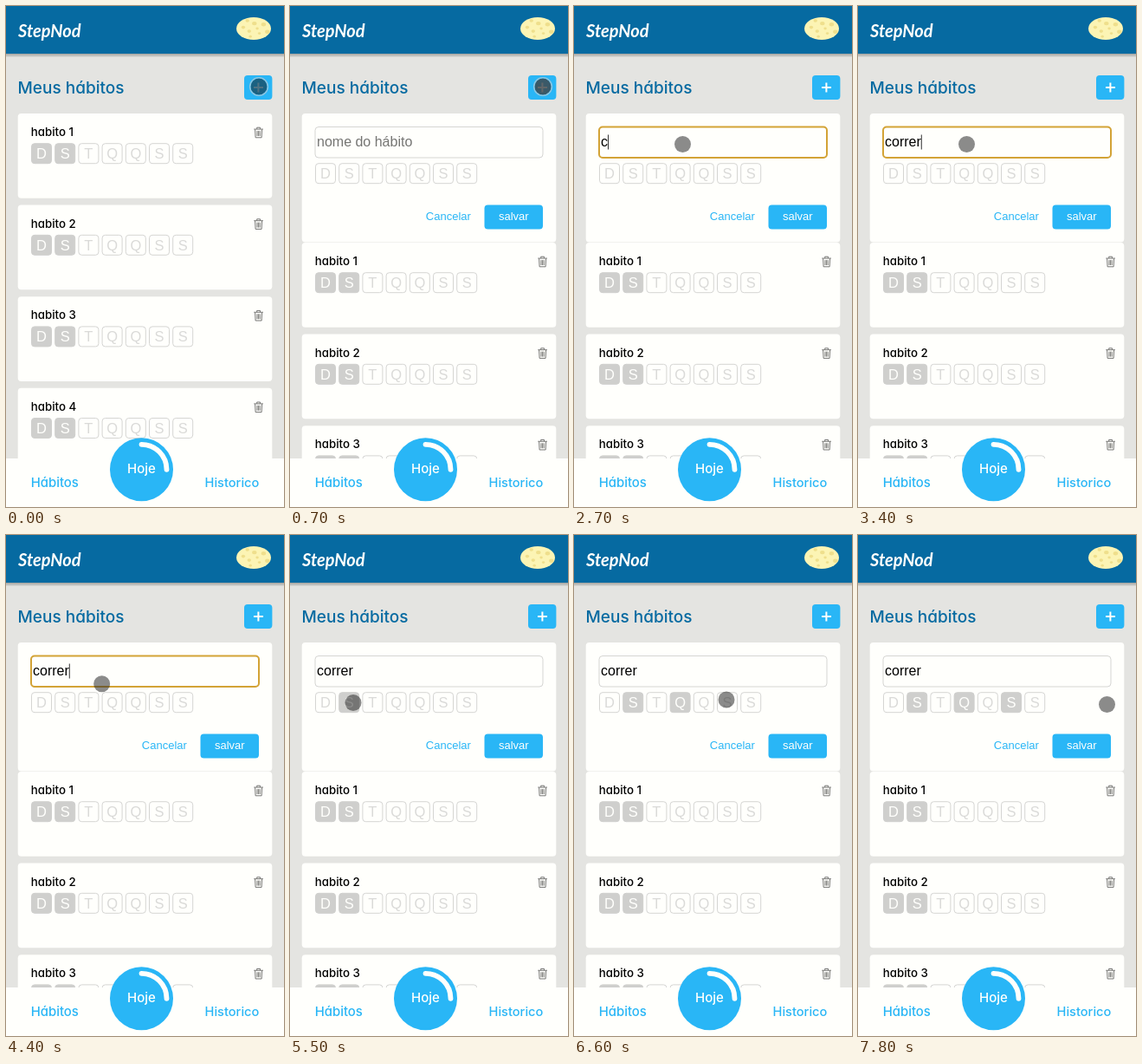
Animation, 321 px wide and 578 px high, one loop 8000 ms. Source, as an HTML page:

```html
<!DOCTYPE html>
<html lang="pt">
<head>
<meta charset="utf-8">
<title>Meus hábitos</title>
<style>
  html, body { margin: 0; width: 100%; height: 100%; overflow: hidden; background: #e4e4e1; }
  svg { display: block; width: 100vw; height: 100vh; }
  text { font-family: Inter, "Noto Sans", sans-serif; font-weight: 500; font-feature-settings: "cv11"; }
  .ui { font-family: "Liberation Sans", Arial, sans-serif; font-weight: 400; }
  .mid { text-anchor: middle; }
  .end { text-anchor: end; }
  .brand { font-family: Lato, sans-serif; font-style: italic; font-weight: 700; }
</style>
</head>
<body>
<svg id="stage" viewBox="0 0 321 578" preserveAspectRatio="none"></svg>
<script>
const NS = 'http://www.w3.org/2000/svg';
const LOOP = 8000, STEP = 100;
const WHITE = '#fffffc', BLUE = '#066aa1', CYAN = '#29b6f6', LINE = '#d5d5d3', CHOSEN = '#cfcfcd';
const PITCH = 105.6;
const stage = document.getElementById('stage');

function set(node, attrs) {
  for (const key in attrs) node.setAttribute(key, attrs[key]);
}
function add(parent, tag, attrs, content) {
  const node = document.createElementNS(NS, tag);
  set(node, attrs);
  if (content !== undefined) node.textContent = content;
  return parent.appendChild(node);
}
const move = (node, x, y) => set(node, { transform: `translate(${x} ${y})` });
const group = (parent, x = 0, y = 0) => add(parent, 'g', { transform: `translate(${x} ${y})` });
const rect = (parent, x, y, width, height, rx, fill, more = {}) =>
  add(parent, 'rect', { x, y, width, height, rx, fill, ...more });
const label = (parent, x, y, size, fill, content, cls = '') =>
  add(parent, 'text', { x, y, 'font-size': size, fill, class: cls }, content);

// One row of weekday boxes; returns a setter for each day
function weekRow(parent, y) {
  return [...'DSTQQSS'].map((day, i) => {
    const left = 29 + i * 27.2;
    const box = rect(parent, left + 0.5, y + 0.5, 23, 23, 3.5, WHITE);
    const letter = label(parent, left + 12, y + 18, 16.5, LINE, day, 'ui mid');
    return on => {
      set(box, { fill: on ? CHOSEN : WHITE, stroke: on ? CHOSEN : LINE });
      set(letter, { fill: on ? WHITE : '#dadad8' });
    };
  });
}

function trash(parent, x, y) {
  add(group(parent, x, y), 'path', {
    d: 'M0 2.5H10.6M3.4 2.3V.6H7.2V2.3M1.3 2.8L1.8 12.2H8.8L9.3 2.8M3.7 4.5V10.4M5.3 4.5V10.4M6.9 4.5V10.4',
    fill: 'none', stroke: '#70706e', 'stroke-width': 0.95
  });
}

function habitCard(parent, index) {
  const card = group(parent, 0, index * PITCH);
  rect(card, 13.7, 124, 293.6, 97.7, 4, WHITE);
  label(card, 28.8, 150.2, 13.3, '#000', `habito ${index + 1}`);
  trash(card, 286.3, 139.6);
  weekRow(card, 158.2).forEach((pick, day) => pick(day < 2));
}

// Page content
rect(stage, 0, 0, 321, 578, 0, '#e4e4e1');
label(stage, 13.5, 101, 19, BLUE, 'Meus hábitos');
rect(stage, 275, 80, 32.4, 28, 4, CYAN);
add(stage, 'path', { d: 'M286 94H297M291.4 88.5V99.5', stroke: WHITE, 'stroke-width': 2 });

const list = group(stage);
for (let i = 0; i < 4; i++) habitCard(list, i);

// New habit form
const form = group(stage);
rect(form, 13.7, 124, 293.6, 148.6, 4, WHITE);
const field = rect(form, 29, 139.5, 263, 35.5, 4, WHITE);
const entry = label(form, 31, 162, 16, '#000', '', 'ui');
const caret = rect(form, 0, 148.5, 1, 17, 0, '#333');
const picks = weekRow(form, 181.2);
label(form, 156.8, 247, 13, CYAN, 'Cancelar', 'ui');
rect(form, 224.5, 229.5, 67.5, 28, 4, CYAN);
label(form, 258.3, 247, 13, WHITE, 'salvar', 'ui mid');

// Header
for (let i = 0; i < 4; i++) rect(stage, 0, 55, 321, 1 + i, 0, '#000', { opacity: 0.07 });
rect(stage, 0, 0, 321, 55, 0, BLUE);
label(stage, 14, 36, 20, WHITE, 'StepNod', 'brand');
add(stage, 'ellipse', { cx: 286, cy: 26, rx: 20, ry: 13, fill: '#fcf4b4' });
for (let i = 0; i < 9; i++) {
  const angle = i * 2.4, reach = Math.sqrt((i + 0.5) / 12);
  add(stage, 'ellipse', {
    cx: 286 + 20 * reach * Math.cos(angle), cy: 26 + 13 * reach * Math.sin(angle),
    rx: 1.7 + i % 3 * 0.5, ry: 1.4 + i % 3 * 0.4, fill: '#efdf8c'
  });
}

// Bottom bar
rect(stage, 0, 522, 321, 56, 0, WHITE);
label(stage, 28.7, 555, 14.9, CYAN, 'Hábitos');
label(stage, 292.3, 555, 14.6, CYAN, 'Historico', 'end');
add(stage, 'circle', { cx: 156.5, cy: 534.8, r: 36.5, fill: CYAN });
add(stage, 'path', {
  d: 'M156.5 505.8A29 29 0 0 1 185.5 534.8', fill: 'none',
  stroke: WHITE, 'stroke-width': 5.8, 'stroke-linecap': 'round'
});
label(stage, 156.5, 539.3, 15, WHITE, 'Hoje', 'mid');

// Pointer
const pointer = group(stage);
const dot = add(pointer, 'circle', { r: 9.5 });
const ring = add(pointer, 'circle', { r: 10.4, fill: 'none', stroke: '#a3c9da', 'stroke-width': 1.4 });

// Straight pointer moves: from and to time, end point
const moves = [
  [1000, 1300, 125.5, 159.5],
  [4300, 4600, 81, 196],
  [4700, 4900, 73, 193.5],
  [5700, 6000, 125.5, 193],
  [6300, 6600, 176, 190],
  [6900, 7000, 184, 191],
  [7300, 7500, 311, 179],
  [7600, 7800, 287.5, 195.5]
];
function pointerAt(t) {
  let x = 292, y = 93;
  for (const [from, to, endX, endY] of moves) {
    const p = Math.min(1, Math.max(0, (t - from) / (to - from)));
    x += (endX - x) * p;
    y += (endY - y) * p;
  }
  return [x, y];
}

const word = 'correr';
const KEY_START = 2700, KEY_GAP = 140;
const clicks = { 1: 5500, 3: 6200, 5: 7200 };

function draw(t) {
  const open = t >= 700;
  move(list, 0, open ? 149 : 0);
  set(form, { visibility: open ? 'visible' : 'hidden' });

  const focus = t >= 1500 && t < clicks[1];
  set(field, { stroke: focus ? '#d3a336' : LINE, 'stroke-width': focus ? 2 : 1 });
  const typed = word.slice(0, Math.max(0, Math.floor((t - KEY_START) / KEY_GAP) + 1));
  entry.textContent = typed || 'nome do hábito';
  set(entry, { fill: typed ? '#000' : '#757573' });
  set(caret, { x: 31 + (typed ? entry.getComputedTextLength() : 0), opacity: focus ? 1 : 0 });
  picks.forEach((pick, day) => pick(t >= clicks[day]));

  move(pointer, ...pointerAt(t));
  const pressed = t < 900;
  set(dot, { fill: !pressed ? 'rgba(40,40,40,.54)' : open ? 'rgba(62,68,72,.82)' : 'rgba(24,70,92,.76)' });
  set(ring, { opacity: pressed ? 0.85 : 0 });
}

const start = performance.now();
function tick() {
  const t = (performance.now() - start) % LOOP;
  draw(Math.floor(t / STEP) * STEP);
  requestAnimationFrame(tick);
}
tick();
</script>
</body>
</html>
```
